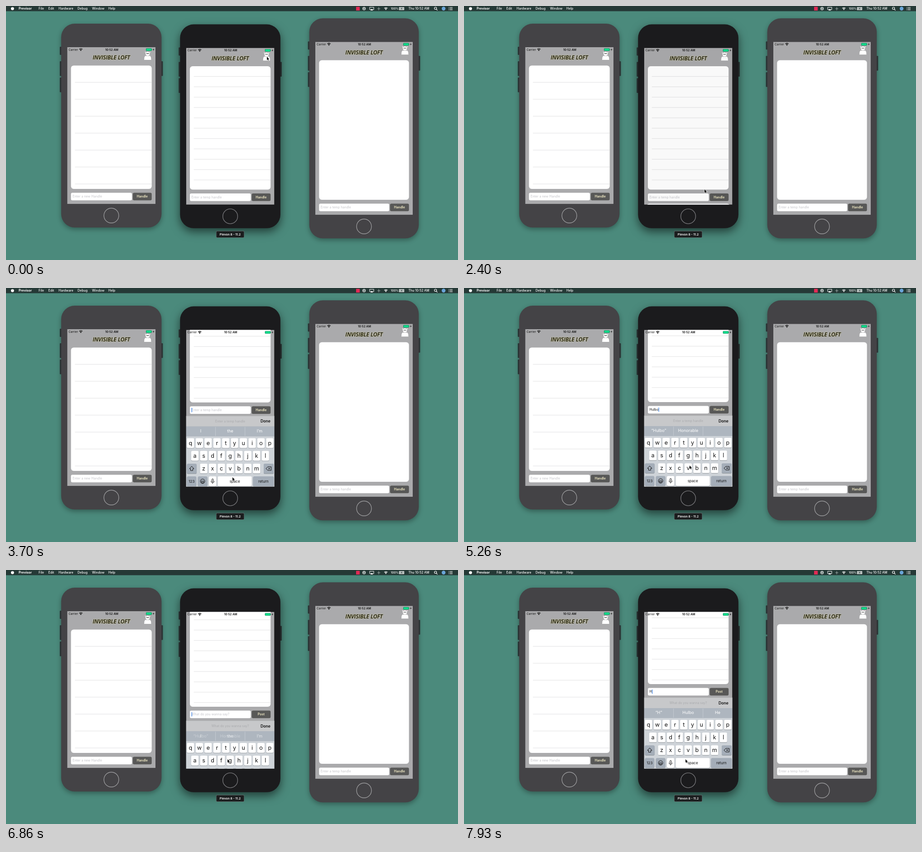
An HTML page with a canvas for the animation above (8 s loop, 998 px wide and 561 px high).

```html
<!DOCTYPE html>
<html lang="en">
<head>
<meta charset="utf-8">
<title>Three phones</title>
<style>
html, body { margin: 0; width: 100%; height: 100%; overflow: hidden; background: #4b8a7c; }
canvas { display: block; }
</style>
</head>
<body>
<canvas id="stage" width="998" height="561"></canvas>
<script>
const c = document.getElementById('stage').getContext('2d');
const LOOP = 8000;
const APP = 'INVISIBLE LOFT', HANDLE = 'Hulbo';
const KEY_TIMES = [3900, 4100, 4280, 4450, 4660];
const SUBMIT = 5560, SECOND_OPEN = 6760, SECOND_KEY = 7450;

const clamp = (v) => Math.max(0, Math.min(1, v));
const smooth = (v) => v * v * (3 - 2 * v);
// Critically damped spring from 0 to 1, starting at `start`.
function spring(t, start) {
  const x = Math.max(0, t - start) * 0.023;
  return 1 - (1 + x) * Math.exp(-x);
}

function box(x, y, w, h, r, fill) {
  c.beginPath();
  c.roundRect(x, y, w, h, r);
  c.fillStyle = fill;
  c.fill();
}
function disc(x, y, r, fill) {
  c.beginPath();
  c.arc(x, y, r, 0, Math.PI * 2);
  c.fillStyle = fill;
  c.fill();
}
function path(points, x, y, { fill, stroke, width = 1, close = true } = {}) {
  c.beginPath();
  points.forEach(([px, py]) => c.lineTo(x + px, y + py));
  if (close) c.closePath();
  if (fill) { c.fillStyle = fill; c.fill(); }
  if (stroke) { c.strokeStyle = stroke; c.lineWidth = width; c.stroke(); }
}
function line(x1, y1, x2, y2, color, width = 1) {
  path([[x1, y1], [x2, y2]], 0, 0, { stroke: color, width, close: false });
}
function text(str, x, y, size, color, { weight = 400, align = 'left', font = 'Inter', style = '' } = {}) {
  c.font = `${style} ${weight} ${size}px "${font}", sans-serif`;
  c.textAlign = align;
  c.fillStyle = color;
  c.fillText(str, x, y + size * 0.36);
}
const centered = (weight = 400) => ({ weight, align: 'center' });

function wifi(x, y, color) {
  c.strokeStyle = color;
  c.lineWidth = 1.2;
  for (const r of [2.7, 4.8]) {
    c.beginPath();
    c.arc(x, y + 2.6, r, Math.PI * 1.23, Math.PI * 1.77);
    c.stroke();
  }
  disc(x, y + 2, 1.1, color);
}
function bolt(x, y, color) {
  path([[0.8, -3], [-1.6, 0.5], [-0.1, 0.5], [-0.8, 3], [1.6, -0.6], [0.1, -0.6]], x, y, { fill: color });
}

function menuBar() {
  box(0, 0, 998, 11.5, 0, '#253936');
  disc(14.3, 5.8, 3.4, '#fff');
  text('Previsor', 28, 5.8, 7.1, '#fff', { weight: 700 });
  const items = { File: 72, Edit: 93.5, Hardware: 116, Debug: 158, Window: 190, Help: 226 };
  for (const name in items) text(name, items[name], 5.8, 7, '#fff', { weight: 500 });
  box(773, 1.7, 8, 8.3, 0.5, '#e12b55');
  disc(790.6, 5.8, 3.7, '#b9c2c0');
  text('2', 790.6, 5.8, 5, '#253936', centered(700));
  c.strokeStyle = '#fff';
  c.lineWidth = 1;
  c.strokeRect(803, 2.8, 9, 5);
  path([[-3, 3.5], [0, 0], [3, 3.5]], 807.5, 6.3, { fill: '#fff' });
  line(823, 2.5, 823, 9.5, '#a5b0ae');
  line(820, 6, 826.5, 6, '#a5b0ae');
  wifi(838.7, 5.7, '#fff');
  text('100%', 849.5, 5.8, 6.5, '#fff', { weight: 500 });
  c.strokeStyle = '#fff';
  c.strokeRect(868.5, 3.2, 10, 5.2);
  box(869.5, 4.2, 8, 3.2, 0, '#c8cfcd');
  bolt(873.5, 5.8, '#253936');
  text('Thu 10:52 AM', 888.5, 5.8, 7, '#fff', { weight: 500 });
  c.beginPath();
  c.arc(948.3, 5, 2.5, 0, 7);
  c.strokeStyle = '#fff';
  c.stroke();
  line(950, 7, 952.7, 9.6, '#fff', 1.2);
  disc(966.2, 5.8, 4.2, '#6aa5d8');
  for (const y of [3.2, 5.8, 8.4]) {
    line(977, y, 978.3, y, '#fff');
    line(979.5, y, 986, y, '#fff');
  }
}

// `x`, `y`: top left of the screen; `w`, `h`: its size.
function phoneBody({ x, y, w, h, body, active }) {
  const left = x - 13.4, top = y - 52, right = x + w + 13.4, bottom = y + h + 52;
  const side = '#303a3b';
  const lower = w > 200 ? 31 : 31;
  box(left - 3, y - 1, 4, 18, 1, side);
  for (const dy of [lower, lower + 36]) box(left - 3, y + dy, 4, 32.5, 1, side);
  box(right - 1, y + lower, 4, 32.5, 1, side);
  c.save();
  c.shadowColor = active ? 'rgba(0,0,0,.55)' : 'rgba(0,0,0,.32)';
  c.shadowBlur = active ? 20 : 11;
  c.shadowOffsetY = active ? 8 : 4;
  box(left, top, right - left, bottom - top, 30, body);
  c.restore();
  c.beginPath();
  c.arc(x + w / 2, bottom - 26.3, 16.4, 0, Math.PI * 2);
  c.strokeStyle = active ? '#77777a' : '#99999b';
  c.lineWidth = 1.4;
  c.stroke();
}

function statusBar({ x, y, w }) {
  text('Carrier', x + 3, y + 5.5, 6.3, '#111');
  wifi(x + 30, y + 5.2, '#111');
  text('10:52 AM', x + w / 2 + 0.9, y + 5.5, 6.4, '#111', centered(600));
  box(x + w - 20.8, y + 2.6, 12.4, 5.6, 1.2, '#087f52');
  box(x + w - 20, y + 3.2, 10.8, 4.4, 0.7, '#10dc8b');
  box(x + w - 8, y + 4.4, 0.9, 2, 0.4, '#10a469');
  bolt(x + w - 4.2, y + 5.4, '#111');
}

function hoodedFigure(x, y, color) {
  line(x - 5.5, y - 9, x - 2, y - 3, color, 1.3);
  line(x + 5.5, y - 9, x + 2, y - 3, color, 1.3);
  disc(x, y - 4.4, 4.5, color);
  path([[-7.7, 9], [-7.2, 3], [-5, 0], [5, 0], [7.2, 3], [7.7, 9]], x, y, { fill: color });
  line(x - 3, y - 5, x + 3, y - 5, '#555', 1.3);
  line(x - 4, y + 0.2, x + 4, y + 0.2, '#bbb', 0.7);
}

// `lift` moves everything up, `stretch` raises only the top part.
function appScreen(phone, { lift = 0, stretch = 0, input = '', caret = false, pressed = false } = {}) {
  const { x, w, h, rowStep, firstRow, hint, action } = phone;
  const y = phone.y - lift, head = y - stretch;
  c.save();
  c.shadowColor = '#dcd25e';
  c.shadowBlur = 2;
  text(APP, x + w / 2, head + 23, 12.1, '#111', { weight: 600, align: 'center', font: 'Open Sans', style: 'italic' });
  c.restore();
  hoodedFigure(x + w - 17.2, head + 19, pressed ? '#8b8b8b' : '#fff');

  const tableBottom = y + h - 33.2, top = head + 40.5;
  box(x + 8.3, top, w - 16.6, tableBottom - top, 6, '#fff');
  if (rowStep) {
    for (let row = top + firstRow; row < tableBottom - 3; row += rowStep) {
      line(x + 17, row, x + w - 8.3, row, '#dededf', 0.9);
    }
  }
  const fieldY = y + h - 24.8, mid = fieldY + 8.4;
  box(x + 8.3, fieldY, w - 60.3, 16.8, 3, '#fff');
  text(input || hint, x + 11.7, mid, 7.1, input ? '#111' : '#c4c4c9');
  if (caret) {
    c.font = '400 7.1px "Inter", sans-serif';
    const cx = x + 12 + (input ? c.measureText(input).width : 0);
    box(cx, fieldY + 3.6, 1.2, 9.6, 0.5, '#2e78e0');
  }
  box(x + w - 50, fieldY, 41.7, 16.8, 3, '#585857');
  text(action, x + w - 29.2, mid, 7.1, '#f6efc9', centered(600));
}

function keyCap(x, y, w, label, { fill = '#fff', size = 12.6 } = {}) {
  box(x, y + 0.9, w, 21.6, 2.6, '#8c9197');
  box(x, y, w, 21.6, 2.6, fill);
  text(label, x + w / 2, y + 10.6, size, '#111', centered());
}

const suggestionSets = [
  { at: 0, words: ['I', 'the', 'I’m'], fade: 1 },
  { at: 3950, words: ['“H”', 'He', 'Hi'], fade: 250 },
  { at: 4330, words: [`“${HANDLE.slice(0, 3)}”`, 'Honorable', ''], fade: 200 },
  { at: 4660, words: [`“${HANDLE}”`, 'Honorable', ''], fade: 150 },
  { at: 6760, words: ['I', 'the', 'I’m'], fade: 150 },
  { at: 7530, words: ['“H”', HANDLE, 'He'], fade: 380 },
];
function suggestions(t, y) {
  const i = suggestionSets.findLastIndex((s) => s.at <= t);
  const now = suggestionSets[i], before = suggestionSets[Math.max(0, i - 1)];
  const shown = clamp((t - now.at) / now.fade);
  now.words.forEach((word, n) => {
    const draw = (str, alpha) => {
      c.globalAlpha = alpha;
      text(str, 430 + n * 65, y, 9.1, '#fff', centered());
    };
    if (word === before.words[n]) draw(word, 1);
    else {
      draw(before.words[n], 1 - shown);
      draw(word, shown);
    }
    c.globalAlpha = 1;
  });
}

function keyboard(t, offset) {
  c.save();
  c.translate(0, offset);
  box(397, 282, 197, 23, 0, '#c7c8ca');
  line(397, 282, 594, 282, '#b4b5b7', 0.6);
  text(t < SECOND_OPEN ? 'Enter a temp handle' : 'What do you wanna say?', 495, 293.5, 7, '#aaabae', centered());
  text('Done', 573, 293.5, 8.7, '#111', centered(600));
  box(397, 305, 197, 22, 0, '#aeb6bf');
  line(462.5, 306, 462.5, 326, '#cbd0d6', 0.8);
  line(527.7, 306, 527.7, 326, '#cbd0d6', 0.8);
  suggestions(t, 315.2);
  box(397, 327, 197, 113, 0, '#ced3d8');

  const rows = [['qwertyuiop', 407.4, 331], ['asdfghjkl', 417.1, 359], ['zxcvbnm', 436.6, 387.2]];
  for (const [letters, start, y] of rows) {
    [...letters].forEach((letter, i) => keyCap(start - 8.1 + i * 19.45, y, 16.2, letter));
  }
  const grey = { fill: '#a4adb8', size: 8 };
  keyCap(399.4, 387.2, 21.4, '', grey);
  path([[0, -5], [5, 0.3], [2.4, 0.3], [2.4, 4.5], [-2.4, 4.5], [-2.4, 0.3], [-5, 0.3]], 410, 398, { stroke: '#111' });
  keyCap(569, 387.2, 22, '', grey);
  path([[-6, 0], [-2, -4], [5.5, -4], [5.5, 4], [-2, 4]], 580, 398, { stroke: '#111' });
  line(579.2, 396, 583.2, 400, '#111');
  line(583.2, 396, 579.2, 400, '#111');

  keyCap(399.4, 415.3, 20.8, '123', grey);
  keyCap(423.7, 415.3, 20.8, '', grey);
  c.strokeStyle = '#111';
  c.lineWidth = 1;
  c.beginPath();
  c.arc(434.1, 426, 5, 0, 7);
  c.stroke();
  disc(432.2, 424.5, 0.8, '#111');
  disc(436, 424.5, 0.8, '#111');
  c.beginPath();
  c.arc(434.1, 426.6, 3, 0, Math.PI);
  c.closePath();
  c.stroke();
  keyCap(448, 415.3, 16.4, '');
  c.beginPath();
  c.roundRect(454.7, 420.6, 3, 6.2, 1.5);
  c.stroke();
  c.beginPath();
  c.arc(456.2, 425.5, 3.6, 0, Math.PI);
  c.stroke();
  line(456.2, 429, 456.2, 431.5, '#111');
  keyCap(467.5, 415.3, 75.2, 'space', { size: 8 });
  keyCap(545.6, 415.3, 45.6, 'return', grey);
  c.restore();
}

function alertSheet(shown) {
  box(397, 92, 197, 348, 0, `rgba(0,0,0,${0.4 * shown})`);
  c.save();
  c.translate(0, (1 - shown) * 80);
  box(403, 361, 184.3, 72.6, 6.5, '#f6f6f7');
  const shade = c.createLinearGradient(528, 0, 555, 0);
  shade.addColorStop(0, 'rgba(225,225,226,0)');
  shade.addColorStop(1, 'rgba(225,225,226,.8)');
  box(528, 412, 59.3, 21.6, [0, 0, 6.5, 0], shade);
  line(403, 404.2, 587.3, 404.2, '#dcdcde', 0.7);
  text('Connected Peeps', 495, 372.5, 6.9, '#8e8e90', centered(600));
  text('You are currently connected to 2 peers', 495, 387, 6.8, '#8e8e90', centered());
  text('Ok', 495, 419, 10.8, '#0b7fe8', centered());
  c.restore();
}

const pointerStops = [
  [1280, 576, 112], [1580, 532, 339], [2090, 531, 405], [2450, 531, 405],
  [2960, 500, 418], [3830, 500, 418], [4030, 498, 392], [6190, 498, 392], [6360, 489, 418],
];
function pointer(t) {
  const i = pointerStops.findIndex((s) => s[0] > t);
  let [, x, y] = pointerStops.at(i < 0 ? -1 : i);
  if (i > 0) {
    const [t0, x0, y0] = pointerStops[i - 1];
    const k = smooth((t - t0) / (pointerStops[i][0] - t0));
    x = x0 + (x - x0) * k;
    y = y0 + (y - y0) * k;
  }
  const arrow = [[0, 0], [0, 7.4], [1.7, 5.9], [2.9, 8.6], [4.2, 8], [3, 5.4], [5.3, 5.3]];
  path(arrow, x, y, { fill: '#111', stroke: '#fff', width: 1.1 });
  path(arrow, x, y, { fill: '#111' });
}

const grey = '#444346';
const leftPhone = { x: 135.2, y: 91, w: 194.8, h: 346.2, body: grey, rowStep: 37.43, firstRow: 37, hint: 'Enter a new Handle', action: 'Handle' };
const midPhone = { x: 397.7, y: 92.6, w: 194.8, h: 346.2, body: '#1b1b1d', active: true, rowStep: 22.86, firstRow: 22.5 };
const rightPhone = { x: 683, y: 79.2, w: 215, h: 382, body: grey, hint: 'Enter a temp handle', action: 'Handle' };

function screen(phone, drawContent) {
  phoneBody(phone);
  c.save();
  c.beginPath();
  c.rect(phone.x, phone.y, phone.w, phone.h);
  c.clip();
  box(phone.x, phone.y, phone.w, phone.h, 0, '#aaaaac');
  drawContent();
  c.restore();
}

function middleContent(t) {
  const closing = spring(t, SUBMIT + 30);
  const reopened = t >= SECOND_OPEN - 30;
  const open = reopened ? spring(t, SECOND_OPEN) : spring(t, 3380) * (1 - closing);
  const raised = reopened ? 1 : spring(t, 3080) * (1 - closing);
  const submitted = t >= SUBMIT;
  const typed = KEY_TIMES.filter((k) => k <= t).length;
  const input = submitted ? (t >= SECOND_KEY ? 'H' : '') : HANDLE.slice(0, typed);
  const phone = {
    ...midPhone,
    hint: submitted ? 'What do you wanna say?' : 'Enter a temp handle',
    action: submitted ? 'Post' : 'Handle',
  };
  appScreen(phone, {
    lift: 153.6 * open,
    stretch: 10.7 * raised,
    input,
    caret: reopened || (t >= 3380 && !submitted),
    pressed: t >= 500 && t < 600,
  });
  if (open > 0.001) keyboard(t, 157 * (1 - open));
  statusBar(phone);
  const sheet = spring(t, 600) * (1 - spring(t, 2200));
  if (sheet > 0.001) alertSheet(sheet);
}

function draw(t) {
  box(0, 0, 998, 561, 0, '#4b8a7c');
  menuBar();
  for (const phone of [leftPhone, rightPhone]) {
    screen(phone, () => { appScreen(phone); statusBar(phone); });
  }
  screen(midPhone, () => middleContent(t));
  box(464, 496.8, 62, 15, 2, '#6c7475');
  box(464.6, 497.4, 60.8, 13.8, 1.6, '#1b1d1e');
  text('Plevon 8 - 11.2', 495, 504.5, 6.7, '#fff', centered(600));
  pointer(t);
}

const start = performance.now();
function tick() {
  draw((performance.now() - start) % LOOP);
  requestAnimationFrame(tick);
}
tick();
</script>
</body>
</html>
```
